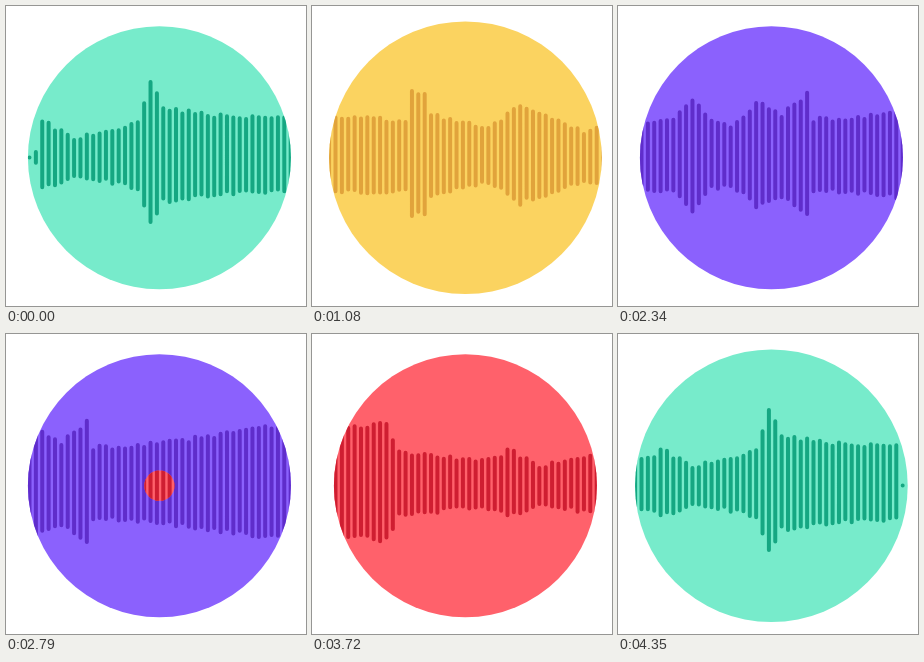
Recreate the animation shown at these times as an HTML page with a canvas. Size 300x300 px, loop 4380 ms.

```html
<!DOCTYPE html>
<html lang="en">
<head>
<meta charset="utf-8">
<title>Waveform disc</title>
<style>
html, body { margin: 0; width: 100%; height: 100%; overflow: hidden; background: #fff; }
canvas { display: block; width: 100vw; height: 100vh; }
</style>
</head>
<body>
<canvas id="stage"></canvas>
<script>
const SIZE = 300, STEP = 30, STEPS = 146;
const CX = 153.4, CY = 151.7, REST = 131.5, PEAK = 145.2;
const BAR = { x0: 23.5, gap: 6.37, width: 4, mid: 151.5 };
const PERIOD = 163, END = 203;
const JITTER = 2.5, LEAN = 0.06;

const green = { fill: '#77ebcb', bar: '#15a782' };
const yellow = { fill: '#fbd360', bar: '#e1a33b' };
const purple = { fill: '#8b61fd', bar: '#5f2dcb' };
const red = { fill: '#ff616b', bar: '#cf1e31' };

// Each disc pops in over the previous one; the first is already at rest.
const discs = [
  { start: -40, ...green },
  { start: 18, ...yellow },
  { start: 54, ...purple },
  { start: 90, ...red },
  { start: 127, ...green }
];

// Loudness envelope: bar index, half height
const envelope = [
  [1, 8], [2, 36], [7, 20], [17, 34], [19, 73], [21, 48], [31, 40],
  [51, 37], [52, 64], [54, 60], [55, 42], [64, 28], [69, 50], [79, 26],
  [92, 39], [95, 58], [98, 35], [101, 30], [105, 53], [109, 42],
  [113, 62], [114, 37], [122, 39], [146, 60], [148, 33], [160, 25], [164, 28]
];

const lerp = (a, b, p) => a + (b - a) * p;
const ease = p => p * p * (3 - 2 * p);
const noise = n => {
  const v = Math.sin(n * 127.1 + 11.7) * 43758.5453;
  return (v - Math.floor(v)) * 2 - 1;
};

function loudness(i) {
  const next = Math.max(1, envelope.findIndex(p => p[0] >= i));
  const [i0, h0] = envelope[next - 1];
  const [i1, h1] = envelope[next];
  return lerp(h0, h1, (i - i0) / (i1 - i0));
}

// The sound is silent at both ends and repeats after PERIOD bars.
function barAt(index) {
  if (index === 0 || index === END) return [BAR.mid - 2, BAR.mid + 2];
  const i = index > PERIOD + 1 ? index - PERIOD : index;
  const h = loudness(i);
  return [
    BAR.mid - h * (1 + LEAN) + noise(i) * JITTER,
    BAR.mid + h * (1 - LEAN) + noise(i + 500) * JITTER
  ];
}

function radiusAt(age) {
  if (age < 15) return PEAK * ease(age / 15);
  if (age < 20) return lerp(PEAK, REST, ease((age - 15) / 5));
  return REST;
}

const canvas = document.getElementById('stage');
const ctx = canvas.getContext('2d');

function resize() {
  const ratio = window.devicePixelRatio || 1;
  canvas.width = Math.round(innerWidth * ratio);
  canvas.height = Math.round(innerHeight * ratio);
}

function drawBars(shift) {
  const cap = BAR.width / 2;
  ctx.beginPath();
  for (let k = -3; k <= 44; k++) {
    const index = k + shift;
    if (index < 0 || index > END) continue;
    const x = BAR.x0 + k * BAR.gap;
    const [top, bottom] = barAt(index);
    ctx.moveTo(x, top + cap);
    ctx.lineTo(x, bottom - cap + 0.01);
  }
  ctx.stroke();
}

function drawDisc(disc, radius, shift) {
  ctx.save();
  ctx.beginPath();
  ctx.arc(CX, CY, radius, 0, Math.PI * 2);
  ctx.fillStyle = disc.fill;
  ctx.fill();
  ctx.clip();
  ctx.strokeStyle = disc.bar;
  ctx.lineWidth = BAR.width;
  ctx.lineCap = 'round';
  drawBars(shift);
  ctx.restore();
}

function draw(step) {
  ctx.setTransform(canvas.width / SIZE, 0, 0, canvas.height / SIZE, 0, 0);
  ctx.fillStyle = '#fff';
  ctx.fillRect(0, 0, SIZE, SIZE);
  const shift = Math.ceil(step * 10 / 9);
  const top = discs.filter(d => step > d.start).length - 1;
  const radius = radiusAt(step - discs[top].start);
  if (radius < REST) drawDisc(discs[top - 1], REST, shift);
  drawDisc(discs[top], radius, shift);
}

let origin;
function tick(now) {
  if (origin === undefined) origin = now;
  draw(Math.floor((now - origin) / STEP + 0.01) % STEPS);
  requestAnimationFrame(tick);
}

addEventListener('resize', resize);
resize();
draw(0);
requestAnimationFrame(tick);
</script>
</body>
</html>
```
